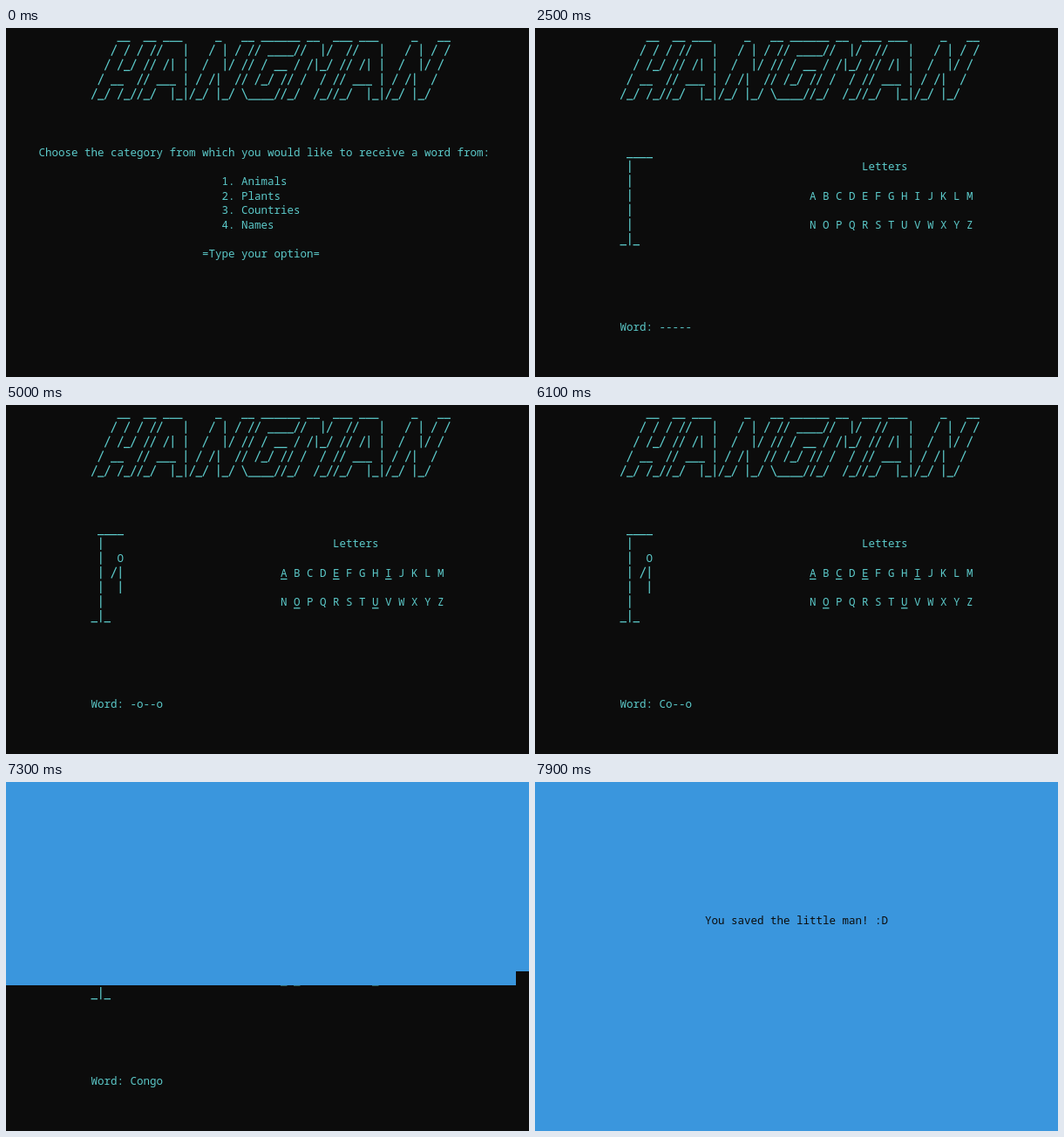
Write an HTML page with a canvas that moves like this. It is 600 px wide and 400 px high and loops after 8 s.

```html
<!DOCTYPE html>
<html lang="en">
<head>
<meta charset="utf-8">
<title>Hangman</title>
<style>
html, body { margin: 0; width: 100%; height: 100%; overflow: hidden; background: #0c0c0c; }
canvas { display: block; width: 600px; height: 400px; }
</style>
</head>
<body>
<canvas id="screen" width="600" height="400"></canvas>
<script>
const ctx = document.getElementById('screen').getContext('2d');
const LOOP = 8000, COLS = 80, CELL_W = 7.5, CELL_H = 400 / 24;
const INK = '#5ccaca', PAPER = '#0c0c0c', WIN = '#3a96dd';

// Banner letters, five rows each, with their starting columns.
const GLYPHS = {
  H: ['    __  __', '   / / / /', '  / /_/ /', ' / __  /', '/_/ /_/'],
  A: ['    ___', '   /   |', '  / /| |', ' / ___ |', '/_/  |_|'],
  N: ['    _   __', '   / | / /', '  /  |/ /', ' / /|  /', '/_/ |_/'],
  G: ['   ______', '  / ____/', ' / / __', '/ /_/ /', '\\____/'],
  M: ['    __  ___', '   /  |/  /', '  / /|_/ /', ' / /  / /', '/_/  /_/']
};
const BANNER = [['H', 13], ['A', 20], ['N', 28], ['G', 36], ['M', 42], ['A', 50], ['N', 58]];

const MENU = [
  [5, 8, 'Choose the category from which you would like to receive a word from:'],
  [33, 10, '1. Animals'],
  [33, 11, '2. Plants'],
  [33, 12, '3. Countries'],
  [33, 13, '4. Names'],
  [30, 15, '=Type your option=']
];

const GAME_START = 1400, FILL_START = 7300, FILL_END = 7400;
const GUESSES = [['A', 3800], ['E', 4000], ['I', 4200], ['O', 4400], ['U', 4700],
                 ['C', 6000], ['N', 6900], ['G', 7200]];
const BODY = [['A', 17, 10, 'O'], ['E', 17, 11, '|'], ['I', 16, 11, '/'], ['U', 17, 12, '|']];
const ANSWER = 'Congo', REVEAL_DELAY = 100;
const guessTime = Object.fromEntries(GUESSES);

function line(x1, y1, x2, y2) {
  ctx.beginPath();
  ctx.moveTo(x1, y1);
  ctx.lineTo(x2, y2);
  ctx.stroke();
}

function drawChar(ch, col, row) {
  const x = col * CELL_W, y = row * CELL_H, mid = x + CELL_W / 2;
  if (ch === ' ') return;
  if (ch === '_') line(x, y + 15.3, x + CELL_W, y + 15.3);
  else if (ch === '|') line(mid, y + 1.7, mid, y + 16);
  else if (ch === '/') line(x + 0.9, y + 15.2, x + 6.6, y + 2.5);
  else if (ch === '\\') line(x + 0.9, y + 2.5, x + 6.6, y + 15.2);
  else ctx.fillText(ch, mid, y + 13.2);
}

function write(col, row, text) {
  [...text].forEach((ch, i) => drawChar(ch, col + i, row));
}

function drawBanner() {
  for (const [name, col] of BANNER) GLYPHS[name].forEach((text, row) => write(col, row, text));
}

function drawGame(t) {
  write(14, 8, '____');
  for (let row = 9; row < 14; row++) write(14, row, '|');
  write(13, 14, '_|_');
  for (const [letter, col, row, ch] of BODY) if (t >= guessTime[letter]) write(col, row, ch);

  write(50, 9, 'Letters');
  for (let i = 0; i < 26; i++) {
    const letter = String.fromCharCode(65 + i);
    const col = 42 + 2 * (i % 13), row = i < 13 ? 11 : 13;
    write(col, row, letter);
    if (t >= guessTime[letter]) {
      const y = (row + 1) * CELL_H - 0.5;
      line(col * CELL_W, y, (col + 1) * CELL_W, y);
    }
  }

  const shown = [...ANSWER].map(ch =>
    t >= guessTime[ch.toUpperCase()] + REVEAL_DELAY ? ch : '-').join('');
  write(13, 20, 'Word: ' + shown);
}

function drawWin(t) {
  ctx.fillStyle = WIN;
  if (t < FILL_END) {
    const cells = 13 * COLS + 78;
    const fullRows = Math.floor(cells / COLS);
    const edge = Math.round(fullRows * CELL_H);
    ctx.fillRect(0, 0, 600, edge);
    ctx.fillRect(0, edge, (cells % COLS) * CELL_W, Math.round((fullRows + 1) * CELL_H) - edge);
    return;
  }
  ctx.fillRect(0, 0, 600, 400);
  ctx.fillStyle = PAPER;
  write(26, 9, 'You saved the little man! :D');
}

function draw(t) {
  ctx.fillStyle = PAPER;
  ctx.fillRect(0, 0, 600, 400);
  ctx.fillStyle = ctx.strokeStyle = INK;
  ctx.lineWidth = 1.25;
  ctx.font = '12.5px "Noto Sans Mono", monospace';
  ctx.textAlign = 'center';
  drawBanner();
  if (t < GAME_START) MENU.forEach(entry => write(...entry));
  else drawGame(t);
  if (t >= FILL_START) drawWin(t);
}

const start = performance.now();
function frame() {
  draw((performance.now() - start) % LOOP);
  requestAnimationFrame(frame);
}
frame();
</script>
</body>
</html>
```
